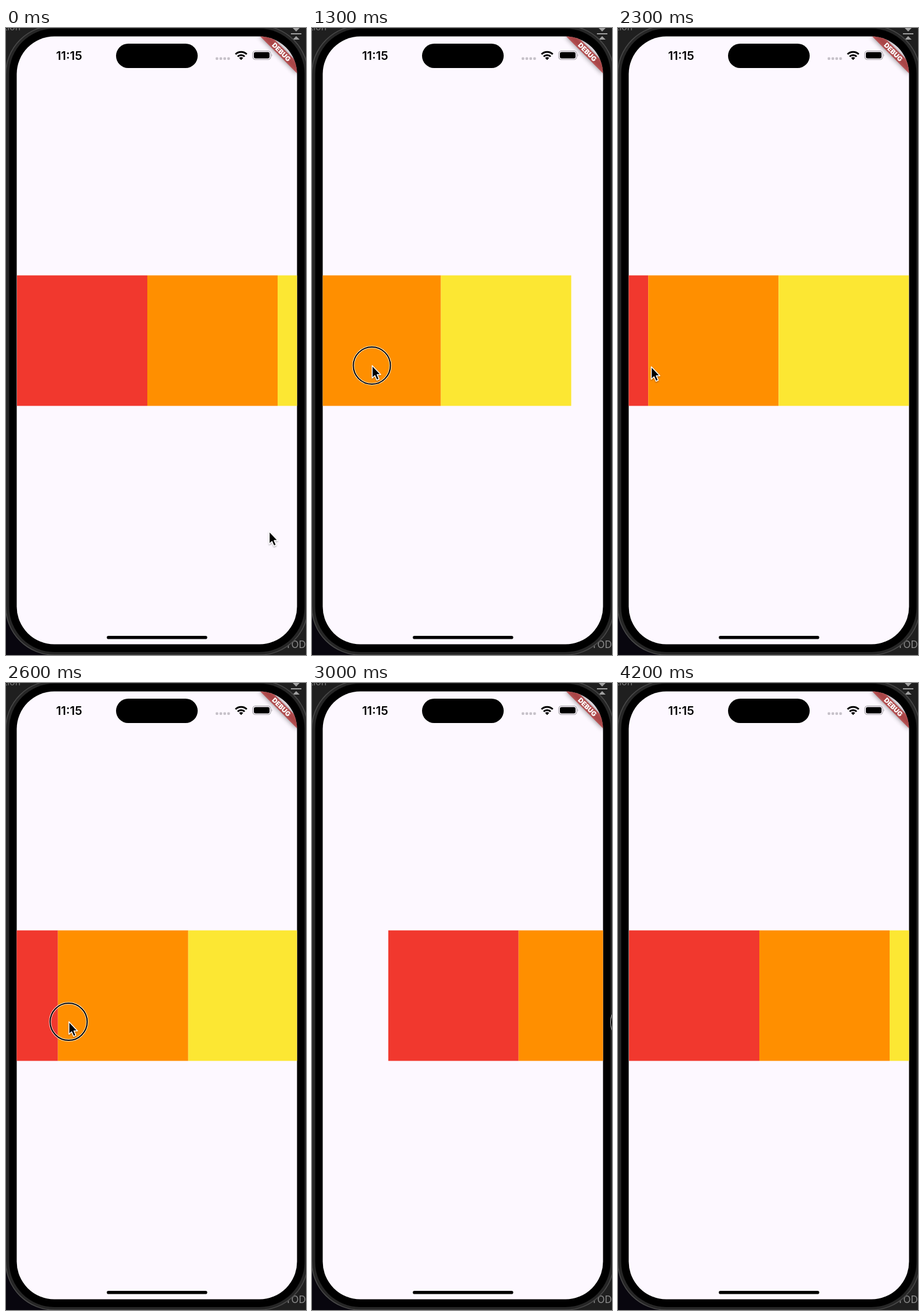
Write an HTML page that moves like this. It is 518 px wide and 1081 px high and loops after 4.3 s.

```html
<!DOCTYPE html>
<html lang="en">
<head>
<meta charset="utf-8">
<title>Bouncing scroll</title>
<style>
  html, body { margin: 0; width: 100%; height: 100%; overflow: hidden; background: #1f1f1f; }
  svg { display: block; width: 100%; height: 100%; }
  text { font-family: Inter, sans-serif; }
</style>
</head>
<body>
<svg viewBox="0 0 518 1081">
  <defs>
    <clipPath id="screen"><rect x="18.5" y="14.5" width="484" height="1048" rx="65"/></clipPath>
    <filter id="soft" x="-50%" y="-150%" width="200%" height="400%"><feGaussianBlur stdDeviation="4.2"/></filter>
    <filter id="shade" x="-50%" y="-50%" width="200%" height="200%">
      <feDropShadow dx="0" dy="1.5" stdDeviation="1.2" flood-opacity=".35"/>
    </filter>
  </defs>

  <!-- desktop behind the phone -->
  <rect width="518" height="1081" fill="#1f1f1f"/>
  <rect y="975" width="100" height="106" fill="#08060e"/>
  <text x="-3" y="4" font-size="16" fill="#777">tion</text>
  <g fill="#a0a0a0">
    <path d="M495 0h12l-6 6zM495 20h12l-6-6z"/>
    <rect x="492" y="9" width="18" height="2"/>
  </g>
  <text x="482" y="1069" font-size="17" fill="#8c8c8c">TODO</text>

  <!-- phone body -->
  <rect x="-.5" y="-4" width="522" height="1085" rx="84" fill="#262626" stroke="#4a4a4a" stroke-width="1.5"/>
  <rect x="5.5" y="1" width="510" height="1075" rx="78"/>

  <g clip-path="url(#screen)">
    <rect x="18" y="14" width="485" height="1049" fill="#fdf8ff"/>
    <g id="strip">
      <rect y="426.5" width="225" height="225" fill="#f1382e"/>
      <rect x="225" y="426.5" width="225" height="225" fill="#ff8f00"/>
      <rect x="450" y="426.5" width="225" height="225" fill="#fce733"/>
    </g>
    <g transform="translate(502.5 14.5) rotate(45) scale(1.125)">
      <rect x="-40" y="28" width="80" height="12" opacity=".5" filter="url(#soft)"/>
      <rect x="-40" y="28" width="80" height="12" fill="#b71c1c" fill-opacity=".63"/>
      <text y="37.6" font-size="10.2" font-weight="900" fill="#fff" text-anchor="middle">DEBUG</text>
    </g>
  </g>

  <!-- status bar and home indicator -->
  <text x="109" y="55" font-size="20.5" font-weight="600" text-anchor="middle">11:15</text>
  <rect x="190" y="27" width="141" height="42" rx="21"/>
  <g fill="#c6c1c9">
    <rect x="362" y="50.5" width="4.5" height="4.5" rx="1.4"/>
    <rect x="368.7" y="50.5" width="4.5" height="4.5" rx="1.4"/>
    <rect x="375.4" y="50.5" width="4.5" height="4.5" rx="1.4"/>
    <rect x="382.1" y="50.5" width="4.5" height="4.5" rx="1.4"/>
  </g>
  <g fill="none" stroke="#000" stroke-width="3">
    <path d="M396.3 45.2a13.8 13.8 0 0 1 19.4 0"/>
    <path d="M400 49.2a8.5 8.5 0 0 1 12 0"/>
  </g>
  <path d="M406 55.2l-3.5-3.6a5 5 0 0 1 7 0z"/>
  <rect x="426" y="39.5" width="31" height="15" rx="4.8" fill="none" stroke="#a5a1a7" stroke-width="1.2"/>
  <rect x="428" y="41.5" width="27" height="11" rx="3"/>
  <path d="M458.5 44.5q2 2.5 0 5z" fill="#a5a1a7"/>
  <rect x="174" y="1048" width="173.5" height="5.6" rx="2.8"/>

  <g id="pointer">
    <g id="ring" fill="none">
      <circle r="32" stroke="#fff" stroke-width="4" stroke-opacity=".8"/>
      <circle r="32" stroke="#000" stroke-width="2"/>
    </g>
    <path d="M.5 0V21.5L5.2 17.2L8.6 25L12.4 23.3L9.1 15.6H15.3Z" fill="#000" stroke="#fff"
      stroke-width="1.5" stroke-linejoin="round" filter="url(#shade)"/>
  </g>
</svg>
<script>
const LOOP = 4300, STEP = 100;
const VIEW = 484, RANGE = 191.5, START = 19, SLOP = 14;
const [strip, pointer, ring] = ['strip', 'pointer', 'ring'].map(id => document.getElementById(id));

const rest = { x: 454, y: 868 }, right = { x: 428, y: 568 }, left = { x: 57, y: 584 }, away = { x: 549, y: 585 };
const firstDrag = { from: 1000, to: 1600, press: 950, release: 1613 };
const secondDrag = { from: 2500, to: 3000, press: 2500, release: 2990 };

const progress = (t, from, to) => Math.min(1, Math.max(0, (t - from) / (to - from)));
const smooth = p => p * p * (3 - 2 * p);
const easeOut = p => 1 - (1 - p) ** 3;
const mix = (a, b, p) => ({ x: a.x + (b.x - a.x) * p, y: a.y + (b.y - a.y) * p });

function pointerAt(t) {
  if (t < firstDrag.from) return mix(rest, right, smooth(progress(t, 0, 900)));
  if (t < secondDrag.from) return mix(right, left, easeOut(progress(t, firstDrag.from, firstDrag.to)));
  return mix(left, away, smooth(progress(t, secondDrag.from, secondDrag.to)));
}

// Rubber band: resistance grows with the square of the remaining view.
function stretch(pull) {
  const k = 0.52 * pull / VIEW;
  return VIEW * k / (1 + k);
}

// Slightly overdamped spring that starts at 1 with no speed.
function spring(ms) {
  const s = ms / 1000, slow = 9.07, fast = 22.05;
  return (fast * Math.exp(-slow * s) - slow * Math.exp(-fast * s)) / (fast - slow);
}

// Distance scrolled by one drag, including the stretch past the end.
function travel(t, drag, origin) {
  const held = Math.min(t, drag.release);
  const moved = Math.max(0, Math.abs(pointerAt(held).x - origin.x) - SLOP);
  const over = stretch(Math.max(0, moved - RANGE));
  return Math.min(moved, RANGE) + over * spring(t - held);
}

function stripAt(t) {
  if (t < firstDrag.from) return START;
  if (t < secondDrag.from) return START - travel(t, firstDrag, right);
  return START - RANGE + travel(t, secondDrag, left);
}

const isHeld = (t, drag) => t >= drag.press && t <= drag.release + 10;

function draw(now) {
  const t = Math.floor((now % LOOP) / STEP) * STEP;
  const { x, y } = pointerAt(t);
  strip.setAttribute('transform', `translate(${stripAt(t)} 0)`);
  pointer.setAttribute('transform', `translate(${x} ${y})`);
  ring.style.display = isHeld(t, firstDrag) || isHeld(t, secondDrag) ? '' : 'none';
}

const begin = performance.now();
function tick() {
  draw(performance.now() - begin);
  requestAnimationFrame(tick);
}
tick();
</script>
</body>
</html>
```
